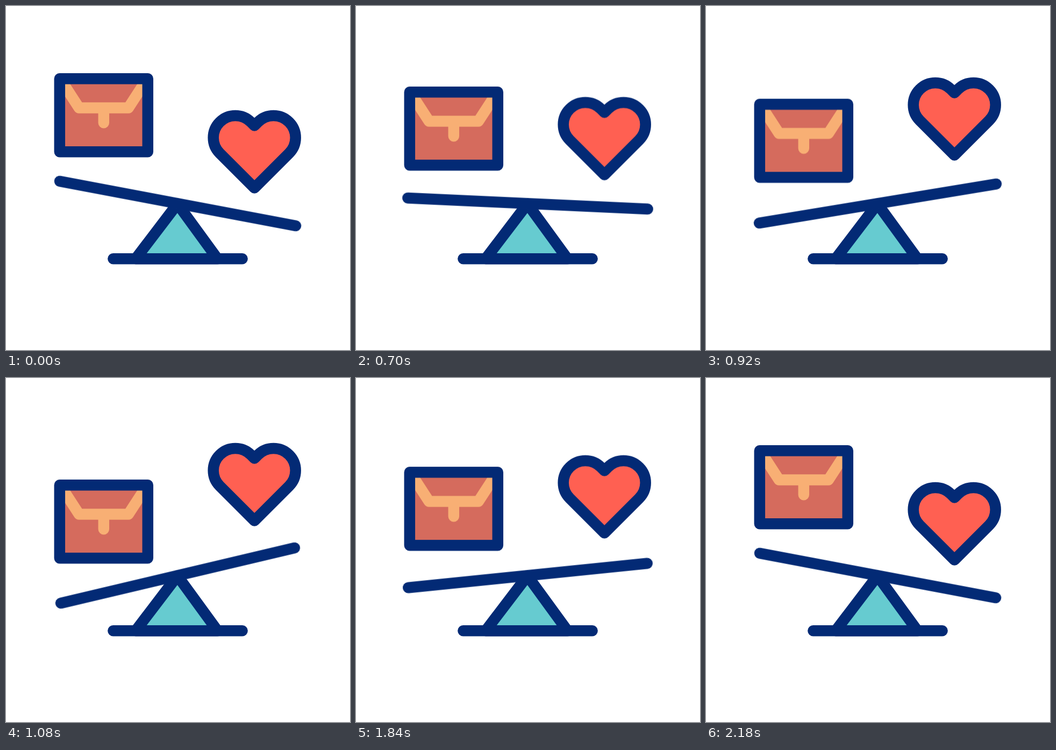
Write an HTML page that moves like this. It is 640x640 px and loops after 2.72 s.

```html
<!DOCTYPE html>
<html lang="en">
<head>
<meta charset="utf-8">
<title>Work and love in balance</title>
<style>
  html, body { margin: 0; width: 100%; height: 100%; overflow: hidden; background: #fff; }
  svg { display: block; width: 100%; height: 100%; }

  .line {
    fill: none;
    stroke: #032a75;
    stroke-width: 20.5;
    stroke-linecap: round;
    stroke-linejoin: round;
  }
  .base { fill: #66cbd0; }
  .leather { fill: #d56b5d; }
  .flap { stroke: #f8af74; }
  .love { fill: #ff6052; }

  .case, .heart, .beam {
    --ease: cubic-bezier(.3333, 0, .6667, 1);
    animation: 2720ms var(--ease) infinite;
  }
  .case { animation-name: case; animation-timing-function: linear; }
  .heart { animation-name: heart; }
  .beam { animation-name: beam; transform-origin: 319.5px 367.5px; }

  /* Moves run from 460 to 1080 ms and back from 1640 to 2180 ms. */
  @keyframes case {
    0%, 16.9118%, 80.1471%, 100% { transform: translateY(0); }
    39.7059%, 60.2941% { transform: translateY(63.9px); }
  }
  @keyframes heart {
    0%, 16.9118%, 80.1471%, 100% { transform: translateY(0); }
    39.7059%, 60.2941% { transform: translateY(-73px); }
  }
  @keyframes beam {
    0%, 16.9118%, 80.1471%, 100% { transform: rotate(10.7deg); }
    39.7059%, 60.2941% { transform: rotate(-13.3deg); }
  }
</style>
</head>
<body>
<svg viewBox="0 0 640 640">
  <path class="line base" d="M319 368 L241.2 470.2 H393.5 Z"/>
  <path class="line" d="M199.4 470.2 H439.6"/>
  <path class="line beam" d="M96.1 367.5 H542.9"/>

  <g class="case">
    <rect class="leather" x="99.8" y="135.2" width="164" height="136.1"/>
    <path class="line flap" d="M100.6 135.2 L135.8 189.4 H227.8 L263 135.2 M181.8 189.4 V217.2"/>
    <rect class="line" x="99.8" y="135.2" width="164" height="136.1"/>
  </g>

  <path class="line love heart" d="M462.2 222.5 L455.7 216 A41 41 0 0 0 397.7 274 L462.2 338.5 L526.7 274 A41 41 0 0 0 468.7 216 Z"/>
</svg>
</body>
</html>
```
